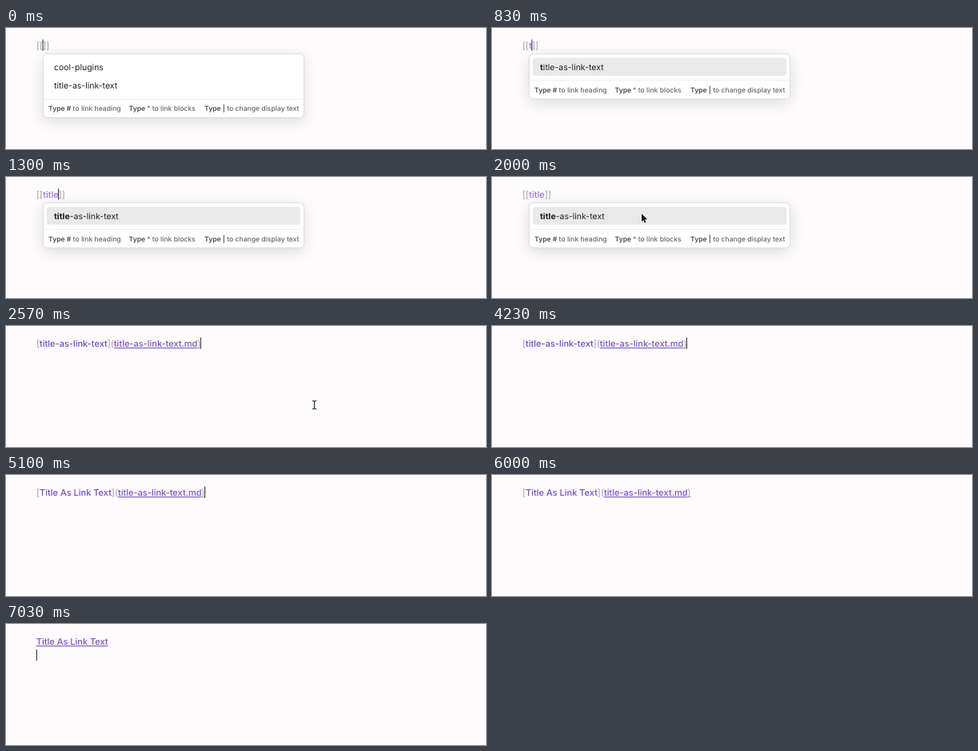
An HTML page with a canvas that plays this animation: 600 px wide and 152 px high, repeating every 7.07 s.

```html
<!DOCTYPE html>
<html lang="en">
<head>
<meta charset="utf-8">
<title>Link completion</title>
<style>
  html, body { margin: 0; width: 100%; height: 100%; overflow: hidden; background: #fdfbfc; }
  canvas { display: block; width: 600px; height: 152px; }
</style>
</head>
<body>
<canvas id="stage"></canvas>
<script>
const LOOP = 7070;
const WIDTH = 600, HEIGHT = 152;
const BASELINE = 26;
const EDITOR = '500 11px Inter, sans-serif';
const EDITOR_THIN = '400 11.2px Inter, sans-serif';
const COLOR = {
  page: '#fdfbfc', bracket: '#a09da2', query: '#976ff0', label: '#7049cb',
  url: '#7a52c9', ink: '#202020', caret: '#3a3a3a'
};
const KEY_TIMES = [800, 900, 1000, 1130, 1230];
const POPUP_CLOSES = 2100;
const TITLE_CHANGES = 4900;
const LINE_BREAK = 6070;

const canvas = document.getElementById('stage');
const ctx = canvas.getContext('2d');
const ratio = window.devicePixelRatio || 1;
canvas.width = WIDTH * ratio;
canvas.height = HEIGHT * ratio;
ctx.textRendering = 'geometricPrecision';

const clamp = v => Math.max(0, Math.min(1, v));
const progress = (t, from, to) => clamp((t - from) / (to - from));
const smooth = p => p * p * (3 - 2 * p);
const easeOut = p => 1 - (1 - p) ** 3;
const mix = (a, b, p) => a + (b - a) * p;

// Draws text and returns the x where it ends.
function write(text, x, y, font, color, underlined) {
  ctx.font = font;
  ctx.fillStyle = color;
  ctx.fillText(text, x, y);
  const end = x + ctx.measureText(text).width;
  if (underlined) ctx.fillRect(x, y + 1.1, end - x, 1.1);
  return end;
}

function roundRect(x, y, w, h, r) {
  ctx.beginPath();
  ctx.roundRect(x, y, w, h, r);
}

function caretOpacity(t) {
  if (t < 730) return t < 230 ? 1 : 0;
  if (t < POPUP_CLOSES) return t < 1770 ? 1 : 0;
  if (t < LINE_BREAK) return (t - POPUP_CLOSES) % 1000 < 500 ? 1 : 0;
  return Math.max(1 - progress(t, 6470, 6600), progress(t, 6940, 7030));
}

function drawCaret(x, top, t) {
  ctx.globalAlpha = caretOpacity(t);
  ctx.fillStyle = COLOR.caret;
  ctx.fillRect(x - 0.6, top, 1.1, 14);
  ctx.globalAlpha = 1;
}

function drawEditor(t, typed) {
  const put = (text, x, color, underlined) =>
    write(text, x, BASELINE, EDITOR, color, underlined);
  const bracket = (text, x, underlined) =>
    write(text, x, BASELINE, EDITOR_THIN, COLOR.bracket, underlined);

  if (t >= LINE_BREAK) {
    put('Title As Link Text', 37.8, COLOR.url, true);
    drawCaret(38.4, 32, t);
    return;
  }
  if (t < POPUP_CLOSES) {
    let x = bracket('[[', 38);
    x = put('title'.slice(0, typed), x, COLOR.query);
    bracket(']]', x);
    drawCaret(x, 14.5, t);
    return;
  }
  const label = t < TITLE_CHANGES ? 'title-as-link-text' : 'Title As Link Text';
  let x = bracket('[', 38);
  x = put(label, x, COLOR.label);
  x = bracket('](', x);
  x = put('title-as-link-text.md', x, COLOR.url, true);
  x = bracket(')', x, true);
  drawCaret(x, 14.5, t);
}

function drawPopup(typed) {
  const shift = typed ? -23.5 : 0;
  const height = 80 + shift;

  ctx.save();
  ctx.shadowColor = 'rgba(0,0,0,0.13)';
  ctx.shadowBlur = 18 * ratio;
  ctx.shadowOffsetY = 5 * ratio;
  ctx.fillStyle = '#fff';
  roundRect(46.5, 32.5, 326, height, 5);
  ctx.fill();
  ctx.restore();
  ctx.strokeStyle = '#dedddf';
  ctx.lineWidth = 1;
  ctx.stroke();

  const row = (text, y, matched) => {
    const x = write(text.slice(0, matched), 60, y, '700 10.5px Inter, sans-serif', COLOR.ink);
    write(text.slice(matched), x, y, '400 10.5px Inter, sans-serif', COLOR.ink);
  };
  if (typed) {
    ctx.fillStyle = '#e9e9e9';
    roundRect(51, 37.5, 317, 22.5, 4);
    ctx.fill();
  } else {
    row('cool-plugins', 52.5, 0);
  }
  row('title-as-link-text', typed ? 52.5 : 76, typed);

  ctx.fillStyle = '#ececec';
  ctx.fillRect(47, 89 + shift, 325, 0.8);
  const hints = [
    [53, 'Type #', ' to link heading'],
    [153.5, 'Type ^', ' to link blocks'],
    [248, 'Type |', ' to change display text']
  ];
  for (const [start, key, action] of hints) {
    const x = write(key, start, 104 + shift, '600 8.6px Inter, sans-serif', '#4c4c4c');
    write(action, x, 104 + shift, '500 8.6px Inter, sans-serif', '#666');
  }
}

function drawArrow(x, y) {
  const outline = [[0, 0], [0, 10.2], [2.3, 8.1], [3.9, 11.7], [5.5, 11], [4, 7.5], [7.2, 7.3]];
  ctx.beginPath();
  for (const [dx, dy] of outline) ctx.lineTo(x + dx, y + dy);
  ctx.closePath();
  ctx.lineJoin = 'round';
  ctx.strokeStyle = '#fff';
  ctx.lineWidth = 1.6;
  ctx.stroke();
  ctx.fillStyle = '#111';
  ctx.fill();
}

function drawIBeam(x, y) {
  ctx.beginPath();
  for (const side of [-1, 1]) {
    const end = y + side * 5.2;
    ctx.moveTo(x - 2.6, end);
    ctx.quadraticCurveTo(x, end, x, end - side * 1.5);
    ctx.quadraticCurveTo(x, end, x + 2.6, end);
  }
  ctx.moveTo(x, y - 4.5);
  ctx.lineTo(x, y + 4.5);
  ctx.strokeStyle = '#333';
  ctx.lineWidth = 1.2;
  ctx.stroke();
}

function drawPointer(t) {
  if (t < 1470 || t >= 2900) return;
  if (t < POPUP_CLOSES) {
    const p = easeOut(progress(t, 1470, 1950));
    drawArrow(mix(205, 187, p), mix(82, 46, p));
    return;
  }
  const across = smooth(progress(t, 2170, 2570));
  const away = smooth(progress(t, 2600, 2890));
  drawIBeam(mix(187, 385.5, across) + 15 * away, mix(50, 99, across) + 40 * away);
}

function draw(t) {
  ctx.setTransform(ratio, 0, 0, ratio, 0, 0);
  ctx.fillStyle = COLOR.page;
  ctx.fillRect(0, 0, WIDTH, HEIGHT);
  const typed = KEY_TIMES.filter(time => t >= time).length;
  if (t < POPUP_CLOSES) drawPopup(typed);
  drawEditor(t, typed);
  drawPointer(t);
}

const start = performance.now();
function tick() {
  draw((performance.now() - start) % LOOP);
  requestAnimationFrame(tick);
}
tick();
</script>
</body>
</html>
```
